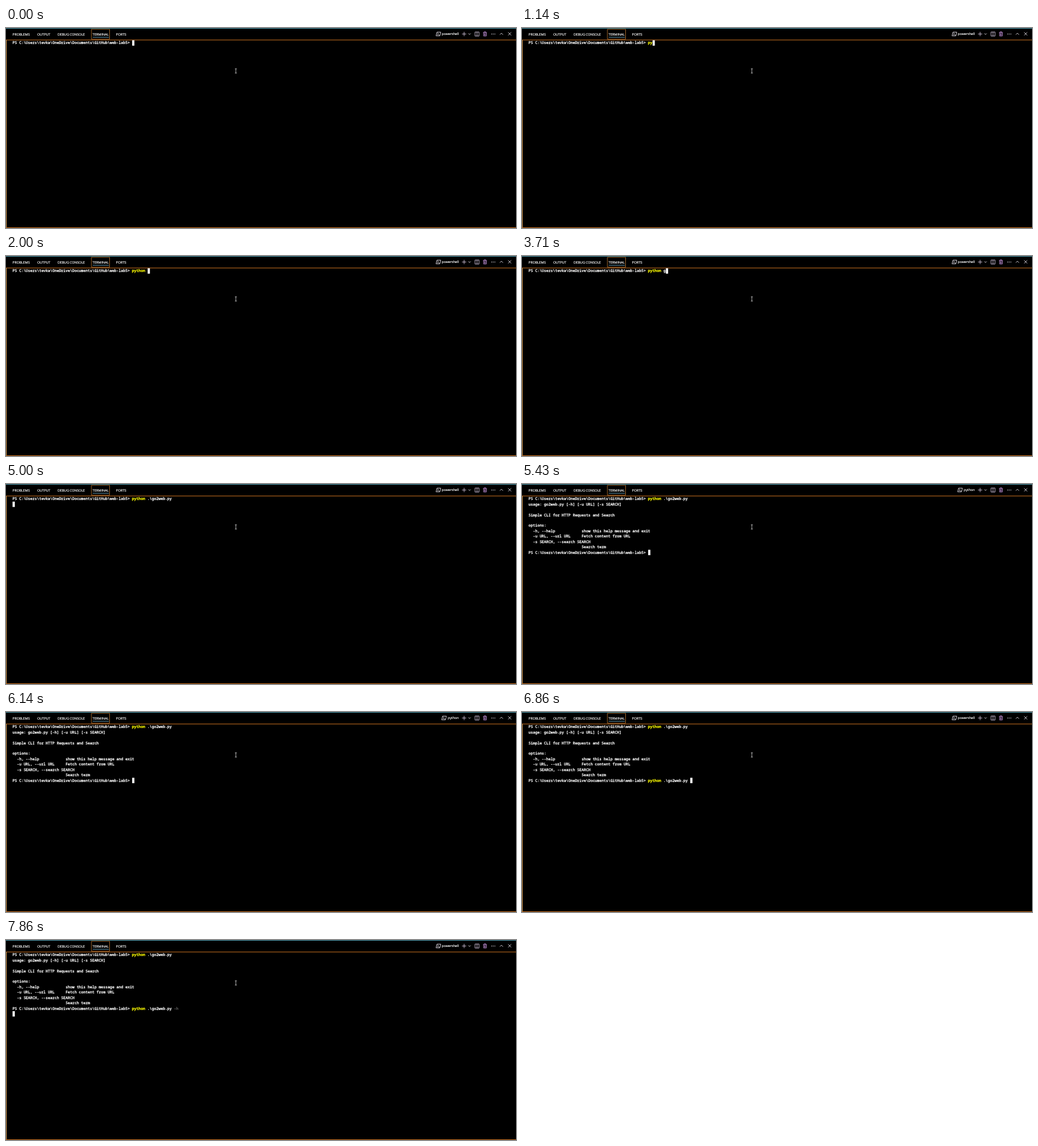
An HTML page that plays this animation: 800x315 px, repeating every 8 s.

```html
<!DOCTYPE html>
<html lang="en">
<head>
<meta charset="utf-8">
<title>Terminal session</title>
<style>
  html, body { margin: 0; width: 100%; height: 100%; overflow: hidden; background: #000; }
  svg { display: block; }
  text { white-space: pre; text-rendering: geometricPrecision; fill: #fff; }
  .bar text { font: 5.22px "Open Sans", "Noto Sans", sans-serif; stroke: #fff; stroke-width: .15; }
  .term text {
    font: 5.79px "Noto Sans Mono", "DejaVu Sans Mono", monospace;
    stroke: #fff; stroke-width: .3;
  }
  .term .program { fill: #ff0; stroke: #ff0; stroke-width: .4; }
  .term .flag { fill: #707070; stroke: #707070; stroke-width: .2; }
  .icons { fill: none; stroke: #ece8f0; stroke-width: .8; }
  .pale { stroke: #decfe8; }
  .violet { stroke: #cc98e2; }
</style>
</head>
<body>
<svg width="800" height="315" viewBox="0 0 800 315">
  <rect width="800" height="315"/>
  <rect width="800" height="1" fill="#4b93a5"/>
  <rect y="18.4" width="800" height="1" fill="#bd691e"/>
  <rect y="19" width="1" height="296" fill="#cc9450"/>
  <rect y="314" width="800" height="1" fill="#bd691e"/>

  <g class="bar">
    <rect x="134" y="2" width="28.5" height="15.5" fill="none" stroke="#a0672c" stroke-width=".9"/>
    <rect x="136" y="14" width="25.5" height=".8" fill="#6fa9bf"/>
    <text x="10.3" y="11.6">PROBLEMS</text>
    <text x="48.9" y="11.6">OUTPUT</text>
    <text x="81" y="11.6">DEBUG CONSOLE</text>
    <text x="135.8" y="11.6">TERMINAL</text>
    <text x="172.5" y="11.6">PORTS</text>
    <text id="shell" x="710.2" y="11.3" text-anchor="end">powershell</text>
  </g>

  <g class="icons">
    <g id="shellIcon">
      <path d="M676 6.5H682L680.6 12.3H674.6ZM676.6 7.8L678.6 9.4L676.2 11M678.6 11.2H680.4"/>
    </g>
    <path class="pale" d="M715.3 9.4H721.9M718.6 6.1V12.7"/>
    <path d="M725.3 8.5L727.1 10.3L728.9 8.5"/>
    <path class="pale" d="M735.8 6.3H742V12.7H735.8ZM738.9 6.3V12.7"/>
    <path class="violet" d="M748.3 7.2H754.3M750 7V6H752.6V7M749.2 7.4V12.6H753.4V7.4M750.6 8.5V11.6M752 8.5V11.6"/>
    <path d="M761.2 9.5H762.4M763.7 9.5H764.9M766.2 9.5H767.4" stroke-width="1.1"/>
    <path d="M774.7 10.5L777.1 8.1L779.5 10.5"/>
    <path d="M787.7 6.8L792.5 11.6M792.5 6.8L787.7 11.6"/>
  </g>

  <g class="term" id="term"></g>
  <rect id="cursor" width="3.5" height="8.5" fill="#fff"/>
  <path d="M359 64.2H362.2M360.6 64.2V71M359 71H362.2" fill="none" stroke="#ddd" stroke-width=".7"/>
</svg>
<script>
const LOOP = 8000, LEFT = 10.3, COL = 3.474, ROW = 8.43;
const PROMPT = "PS C:\\Users\\tevka\\OneDrive\\Documents\\GitHub\\web-lab5> ";
const RUN = "python .\\go2web.py";
const HELP = `usage: go2web.py [-h] [-u URL] [-s SEARCH]

Simple CLI for HTTP Requests and Search

options:
  -h, --help            show this help message and exit
  -u URL, --url URL     Fetch content from URL
  -s SEARCH, --search SEARCH
                        Search term`.split("\n");

// [start in ms, typed text]
const FIRST = [
  [0, ""], [290, "p"], [710, "py"], [1430, "pyth"], [1570, "pytho"],
  [1860, "python"], [2000, "python "], [3710, "python g"],
  [3860, "python go"], [4000, "python go2"], [4140, RUN]
];
const SECOND = [[0, ""], [6290, RUN], [6860, RUN + " "], [7000, RUN + " -"], [7140, RUN + " -h"]];
const ENTER = 4570, OUTPUT = 5290, READY = 5430, RENAMED = 6290, ENTER_AGAIN = 7860;

const $ = id => document.getElementById(id);
const NS = "http://www.w3.org/2000/svg";

function add(parent, tag, attrs, content = "") {
  const el = document.createElementNS(NS, tag);
  for (const key in attrs) el.setAttribute(key, attrs[key]);
  el.textContent = content;
  return parent.appendChild(el);
}

const addLine = (row, content) =>
  add($("term"), "text", { x: LEFT, y: (25.3 + row * ROW).toFixed(2) }, content);

function addCommand(row) {
  const line = addLine(row, PROMPT);
  const parts = ["program", "arg", "flag"].map(name => add(line, "tspan", { class: name }));
  return { line, parts };
}

const show = (el, on) => el.setAttribute("visibility", on ? "visible" : "hidden");
const typedAt = (steps, t) => steps.filter(step => step[0] <= t).pop()[1];

const first = addCommand(0);
const help = HELP.map((content, i) => addLine(i + 1, content));
const second = addCommand(10);

function type(command, typed) {
  const words = typed.split(" ");
  command.parts.forEach((part, i) => {
    part.textContent = i < words.length ? (i ? " " : "") + words[i] : "";
  });
}

function cursorAt(t, a, b) {
  if (t < ENTER) return [0, PROMPT.length + a.length];
  if (t < OUTPUT) return [1, 0];
  if (t < READY) return [10, 0];
  if (t < ENTER_AGAIN) return [10, PROMPT.length + b.length];
  return [11, 0];
}

function paint(t) {
  const a = typedAt(FIRST, t), b = typedAt(SECOND, t);
  type(first, a);
  type(second, b);
  help.forEach(line => show(line, t >= OUTPUT));
  show(second.line, t >= READY);

  const [row, col] = cursorAt(t, a, b);
  $("cursor").setAttribute("x", LEFT + col * COL);
  $("cursor").setAttribute("y", 19.3 + row * ROW);

  const python = t >= READY && t < RENAMED;
  $("shell").textContent = python ? "python" : "powershell";
  $("shellIcon").setAttribute("transform", `translate(${python ? 8.8 : 0} 0)`);
}

const start = performance.now();
function tick() {
  paint((performance.now() - start) % LOOP);
  requestAnimationFrame(tick);
}
tick();
</script>
</body>
</html>
```
